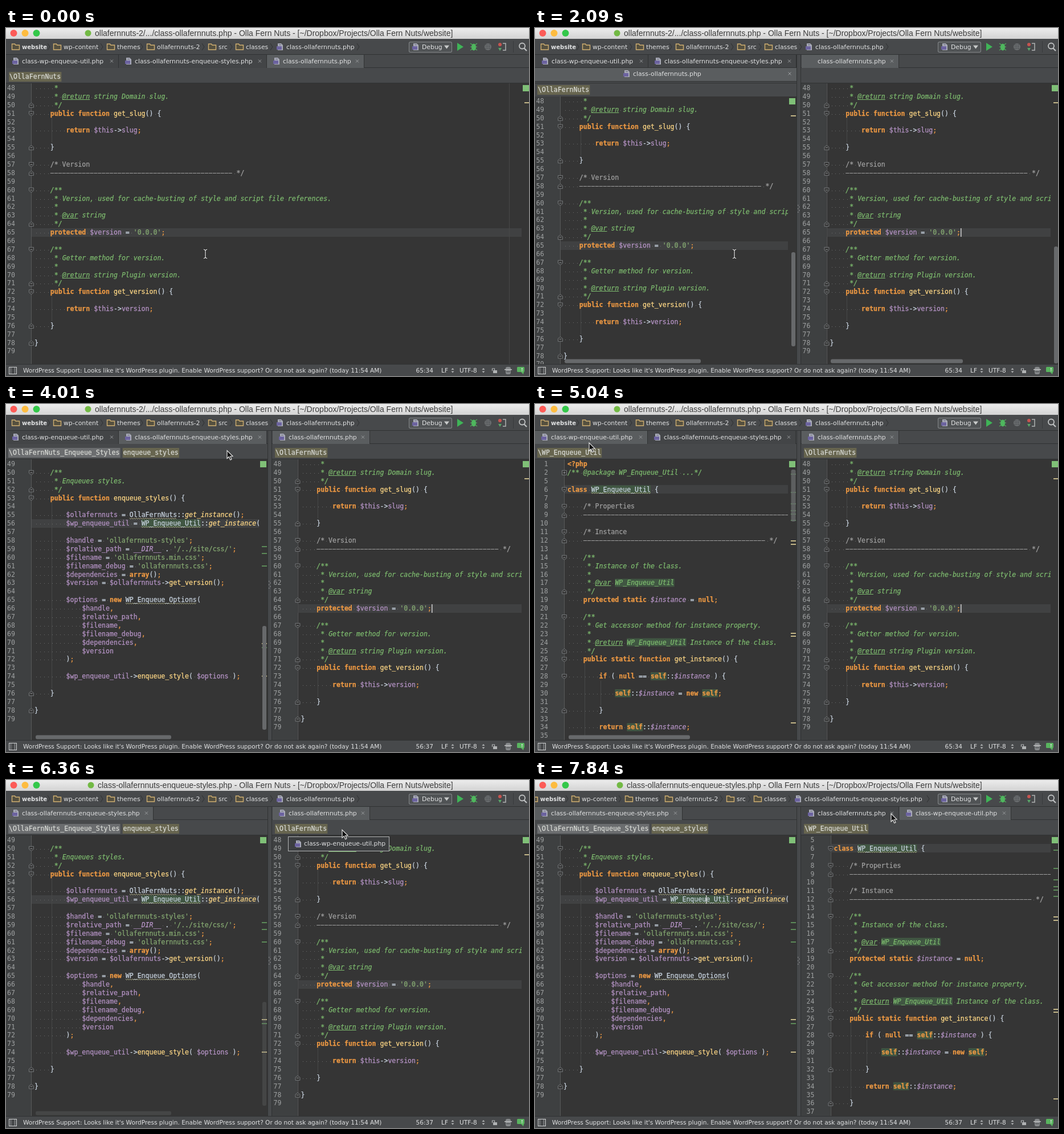
Write an HTML page with a canvas that moves like this. It is 918 px wide and 610 px high and loops after 8 s.

```html
<!DOCTYPE html>
<html lang="en">
<head>
<meta charset="utf-8">
<title>Editor split</title>
<style>
html, body { margin: 0; width: 100%; height: 100%; overflow: hidden; background: #363636; }
canvas { display: block; }
</style>
</head>
<body>
<canvas id="stage" width="918" height="610"></canvas>
<script>
const ctx = document.getElementById('stage').getContext('2d');
const LOOP = 8000, TICK = 147.8, LAST_TICK = 53;
const CHAR = 6.95, LINE = 14.887, BOTTOM = 589;
const MONO = '11.54px "DejaVu Sans Mono", monospace';
const UI = '10.85px "DejaVu Sans", sans-serif';
const SMALL = '10.55px "DejaVu Sans", sans-serif';
const COLOR = {
  bar: '#47494b', edge: '#303233', editor: '#353535', gutter: '#3e4041', caretRow: '#404142',
  text: '#c8d3df', keyword: '#ec9843', variable: '#b694c6', string: '#86aa72', call: '#ffd886',
  doc: '#7dba6e', comment: '#a1a1a1', mark: '#405642', number: '#9ea0a1', label: '#e0e1e2',
  green: '#5c8a58', tan: '#c3b687', ok: '#7fc077'
};
const KEYWORDS = new Set('public protected static function return class new null if self array'.split(' '));
const DASHES = '-'.repeat(46);

const makeFile = (name, crumbs, first, fold, caretLine, marks, source) => ({
  name, crumbs, fold, caretLine, marks,
  rows: source.split('\n').slice(1, -1).map((code, i) => ({ code, number: first(i) }))
});

const main = makeFile('class-ollafernnuts.php', ['\\OllaFernNuts'], i => i + 48, 44, 65,
  { tan: [131], green: [] }, `
     *
     * @return string Domain slug.
     */
    public function get_slug() {

        return $this->slug;

    }

    /* Version
    ${DASHES} */

    /**
     * Version, used for cache-busting of style and script file references.
     *
     * @var string
     */
    protected $version = '0.0.0';

    /**
     * Getter method for version.
     *
     * @return string Plugin version.
     */
    public function get_version() {

        return $this->version;

    }

}

`);

const util = makeFile('class-wp-enqueue-util.php', ['\\WP_Enqueue_Util'], i => i < 2 ? i + 1 : i + 3, 51, 6,
  { tan: [240, 246, 402, 407, 559], green: [123, 155, 175, 187, 193, 204] }, `
<?php
/** @package WP_Enqueue_Util ...*/

class WP_Enqueue_Util {

    /* Properties
    ${DASHES + DASHES} */

    /* Instance
    ${DASHES} */

    /**
     * Instance of the class.
     *
     * @var WP_Enqueue_Util
     */
    protected static $instance = null;

    /**
     * Get accessor method for instance property.
     *
     * @return WP_Enqueue_Util Instance of the class.
     */
    public static function get_instance() {

        if ( null == self::$instance ) {

            self::$instance = new self;

        }

        return self::$instance;

    }

`);

const styles = makeFile('class-ollafernnuts-enqueue-styles.php', ['\\OllaFernNuts_Enqueue_Styles', 'enqueue_styles'],
  i => i + 49, 44, 56, { tan: [420, 477], green: [250, 262, 284, 427] }, `

    /**
     * Enqueues styles.
     */
    public function enqueue_styles() {

        $ollafernnuts = OllaFernNuts::get_instance();
        $wp_enqueue_util = WP_Enqueue_Util::get_instance();

        $handle = 'ollafernnuts-styles';
        $relative_path = __DIR__ . '/../site/css/';
        $filename = 'ollafernnuts.min.css';
        $filename_debug = 'ollafernnuts.css';
        $dependencies = array();
        $version = $ollafernnuts->get_version();

        $options = new WP_Enqueue_Options(
            $handle,
            $relative_path,
            $filename,
            $filename_debug,
            $dependencies,
            $version
        );

        $wp_enqueue_util->enqueue_style( $options );

    }

}

`);

function rect(x, y, w, h, color) {
  ctx.fillStyle = color;
  ctx.fillRect(x, y, w, h);
}
function frameRect(x, y, w, h, color) {
  ctx.strokeStyle = color;
  ctx.lineWidth = 1;
  ctx.strokeRect(x + .5, y + .5, w - 1, h - 1);
}
function rounded(x, y, w, h, r, color) {
  ctx.fillStyle = color;
  ctx.beginPath();
  ctx.roundRect(x, y, w, h, r);
  ctx.fill();
}
function disc(x, y, r, color) {
  ctx.fillStyle = color;
  ctx.beginPath();
  ctx.arc(x, y, r, 0, 7);
  ctx.fill();
}
function path(points, fill, stroke, width = 1) {
  ctx.beginPath();
  points.forEach(([x, y], i) => i ? ctx.lineTo(x, y) : ctx.moveTo(x, y));
  if (fill) { ctx.closePath(); ctx.fillStyle = fill; ctx.fill(); }
  if (stroke) { ctx.strokeStyle = stroke; ctx.lineWidth = width; ctx.stroke(); }
}
function text(str, x, y, color = COLOR.label, font = UI, align = 'left') {
  ctx.font = font;
  ctx.fillStyle = color;
  ctx.textAlign = align;
  ctx.fillText(str, x, y);
}
function clipped(x, y, w, h, draw) {
  ctx.save();
  ctx.beginPath();
  ctx.rect(x, y, w, h);
  ctx.clip();
  draw();
  ctx.restore();
}

function fileIcon(x, y) {
  path([[x + 2, y - 6], [x + 8, y - 6], [x + 11, y - 3], [x + 11, y + 6], [x + 2, y + 6]], '#a9abb8');
  rect(x, y - 1, 9, 6, '#6c63a0');
  rect(x + 4, y - 4, 4, 1, '#66687a');
}
function folderIcon(x, y) {
  path([[x + .5, y + 5], [x + .5, y - 5], [x + 5.5, y - 5], [x + 7, y - 3], [x + 13.5, y - 3], [x + 13.5, y + 5], [x + .5, y + 5]],
    '#55503f', '#cfae71', 1.4);
}
function closeIcon(x, y) {
  path([[x - 2.5, y - 2.5], [x + 2.5, y + 2.5]], null, '#999c9e');
  path([[x + 2.5, y - 2.5], [x - 2.5, y + 2.5]], null, '#999c9e');
}
function updown(x) {
  path([[x - 2.5, 599], [x, 596], [x + 2.5, 599]], '#b0b2b3');
  path([[x - 2.5, 601.5], [x, 604.5], [x + 2.5, 601.5]], '#b0b2b3');
}

function squiggle(x, width, y) {
  const points = [];
  for (let i = 0; i <= width; i += 2) points.push([x + i, y + (i % 4 ? 1 : -1)]);
  path(points, null, '#b3b28a', 1);
}

// A hairline outline gives the code its slightly heavy smoothing.
function drawToken(str, x, y, color, style = '') {
  text(str, x, y + 4, color, style + ' ' + MONO);
  ctx.strokeStyle = color;
  ctx.lineWidth = .25;
  ctx.strokeText(str, x, y + 4);
}

function drawDoc(code, x, y) {
  const tagged = /^\s+\* @/.test(code);
  for (const { 0: part, index } of code.matchAll(/@\w+|WP_Enqueue_Util|\S+|\s+/g)) {
    const left = x + index * CHAR, width = part.length * CHAR;
    if (tagged && part === 'WP_Enqueue_Util') rect(left, y - 7, width, 14, COLOR.mark);
    const tag = tagged && part[0] === '@';
    drawToken(part, left, y, COLOR.doc, 'italic');
    if (tag) rect(left, Math.round(y + 5), width, 1, COLOR.doc);
  }
}

function drawComment(code, x, y) {
  const dashes = code.match(/-{9,}/);
  if (!dashes) return drawToken(code, x, y, COLOR.comment);
  const start = x + dashes.index * CHAR, end = start + dashes[0].length * CHAR;
  ctx.setLineDash([6.2, CHAR - 6.2]);
  path([[start, Math.round(y) + .5], [end, Math.round(y) + .5]], null, COLOR.comment);
  ctx.setLineDash([]);
  drawToken('*/', end + CHAR, y, COLOR.comment);
}

function drawCode(code, x, y) {
  let previous = '';
  for (const { 0: part, index } of code.matchAll(/'[^']*'|\$\w+|<\?php|\w+|->|::|\s+|./g)) {
    const left = x + index * CHAR, width = part.length * CHAR;
    const rest = code.slice(index + part.length);
    let color = COLOR.text, style = '';
    if (part[0] === "'") color = COLOR.string;
    else if (part[0] === '$') {
      color = COLOR.variable;
      if (part === '$instance') style = 'italic';
    } else if (KEYWORDS.has(part) || part === '<?php') {
      color = COLOR.keyword;
      style = 'bold';
      if (part === 'self') rect(left, y - 7, width, 14, COLOR.mark);
    } else if (part === '__DIR__') {
      color = COLOR.variable;
      style = 'italic';
    } else if (/^[A-Z]/.test(part)) {
      if (part === 'WP_Enqueue_Util') rect(left, y - 7, width, 14, COLOR.mark);
      squiggle(left, width, y + 6.5);
    } else if (/^\w/.test(part)) {
      if (rest[0] === '(') {
        color = COLOR.call;
        if (previous === '::') style = 'italic';
      } else if (previous === '->') color = COLOR.variable;
    } else if (part === ';' || part === ',') color = COLOR.keyword;
    drawToken(part, left, y, color, style);
    previous = part;
  }
}

function foldMark(code, x, y) {
  const opens = /\/\*|\{$/.test(code), closes = /\*\/$|^\s*\}$/.test(code);
  if (!opens && !closes) return;
  const a = opens ? -4 : 4, tip = opens ? 4 : -4;
  const shape = opens && closes
    ? [[x - 4, y - 4], [x + 4, y - 4], [x + 4, y + 4], [x - 4, y + 4], [x - 4, y - 4]]
    : [[x - 4, y + a], [x + 4, y + a], [x + 4, y + tip / 4], [x, y + tip], [x - 4, y + tip / 4], [x - 4, y + a]];
  path(shape, COLOR.editor, '#7b7e80', .9);
  path([[x - 2, y], [x + 2, y]], null, '#8b8e90');
  if (opens && closes) path([[x, y - 2], [x, y + 2]], null, '#8b8e90');
}

function drawGuides(rows, x, yOf) {
  rows.forEach(({ code }, i) => {
    const indent = code.search(/\S/);
    if (indent < 1 || !code.endsWith('{')) return;
    const end = rows.findIndex((row, j) => j > i && row.code === ' '.repeat(indent) + '}');
    if (end > i) rect(Math.round(x + indent * CHAR + 2), yOf(i) + 8, 1, yOf(end) - yOf(i) - 16, '#474848');
  });
}

// One editor with gutter, code, error stripe and optional caret column.
function drawEditor({ file, x, textRight, right, top = 97, skip = 0, caret = -1 }) {
  const rows = file.rows.slice(skip);
  const fold = x + file.fold, left = fold + 6;
  const yOf = i => top + 8 + i * LINE;
  rect(x, top, right + 2 - x, BOTTOM - top, COLOR.editor);
  rect(x, top, fold - x, BOTTOM - top, COLOR.gutter);
  rect(Math.round(fold), top, 1, BOTTOM - top, '#58595a');
  clipped(x, top, textRight - x, BOTTOM - top, () => {
    const current = rows.findIndex(row => row.number === file.caretLine);
    rect(fold + 1, Math.round(yOf(current) - 7.5), textRight, 15, COLOR.caretRow);
    rect(Math.round(left + 120 * CHAR) - 1, top, 1, BOTTOM - top, '#484848');
    drawGuides(rows, left, yOf);
    rows.forEach(({ code, number }, i) => {
      const y = yOf(i);
      text(number, fold - 28, y + 4, COLOR.number, MONO, 'right');
      foldMark(code, fold + .5, y + .5);
      for (const { index } of code.matchAll(/ /g)) rect(Math.round(left + index * CHAR + 3), Math.round(y + 1), 1, 1, '#6c6d6d');
      if (/^\s*(\/\*\*|\*)/.test(code)) drawDoc(code, left, y);
      else if (/^\s*(\/\*|-{9})/.test(code)) drawComment(code, left, y);
      else drawCode(code, left, y);
    });
    if (caret >= 0) rect(Math.round(left + caret * CHAR), Math.round(yOf(current) - 7.5), 1.5, 15, '#d0d0d0');
  });
  rect(right - 11, top + 3, 11, 11, COLOR.ok);
  for (const kind of ['green', 'tan']) {
    for (const y of file.marks[kind]) rect(right - 8, y + top - 98, 9, 2, COLOR[kind]);
  }
}

function drawCrumbs(file, x, y) {
  let left = x + 4;
  file.crumbs.forEach((crumb, i) => {
    const width = crumb.length * CHAR + 2;
    rect(left, y - 8, width, 17, i === file.crumbs.length - 1 ? '#67654f' : '#6b6d6f');
    drawToken(crumb, left + 1, y, '#d8dad5');
    left += width + 4;
  });
}

function drawTab(x, end, file, active, icon = true) {
  rect(x, 47, end - x, 23, active ? '#5a5d5f' : '#434547');
  rect(end, 47, 1, 23, COLOR.edge);
  if (icon) fileIcon(x + 11, 58);
  text(file.name, x + 28, 62);
  closeIcon(end - 11.5, 58);
}

const fade = (tick, end) => Math.max(0, Math.min(1, (end - tick) / 3));
function scrollbar(x, y, w, h, alpha) {
  ctx.globalAlpha = alpha;
  rounded(x, y, w, h, 3, '#67696b');
  ctx.globalAlpha = 1;
}

function drawTitle(tick) {
  const shade = ctx.createLinearGradient(0, 0, 0, 19);
  shade.addColorStop(0, '#ececec');
  shade.addColorStop(1, '#d3d3d3');
  rect(0, 0, 918, 19, shade);
  ['#fc5b57', '#fdbc40', '#34c84a'].forEach((color, i) => disc(13.5 + 20 * i, 9, 6, color));
  const late = tick >= 41, x = late ? 161 : 156;
  disc(x - 12, 9, 5.5, '#72b944');
  text((late ? styles.name : 'ollafernnuts-2/.../' + main.name) +
    ' - Olla Fern Nuts - [~/Dropbox/Projects/Olla Fern Nuts/website]', x, 14, '#3d3d3d',
    '14px "Liberation Sans", Arial, sans-serif');
}

function drawNav(tick) {
  rect(0, 19, 918, 28, COLOR.bar);
  rect(0, 46, 918, 1, COLOR.edge);
  const late = tick >= 48, shift = late ? -19 : 0;
  const items = [['website', 10, 75], ['wp-content', 83, 168], ['themes', 177, 238],
    ['ollafernnuts-2', 247, 346], ['src', 355, 395], ['classes', 403, 466]];
  const chevron = x => path([[x - 2, 27], [x + 2, 33], [x - 2, 39]], null, '#2f3132');
  items.forEach(([name, x, end], i) => {
    folderIcon(x + shift, 33);
    text(name, x + 18 + shift, 37, COLOR.label, i ? UI : 'bold 10px "DejaVu Sans", sans-serif');
    chevron(end + shift);
  });
  fileIcon(475 + shift, 33);
  text((late ? styles : main).name, 492 + shift, 37);
  chevron(late ? 690 : 618);

  rounded(707, 24, 76, 19, 3, '#85888a');
  rounded(708, 25, 74, 17, 2, '#505355');
  fileIcon(713, 33);
  text('Debug', 730, 37);
  path([[769, 30.5], [778, 30.5], [773.5, 36.5]], '#c8caca');
  path([[792, 26], [803, 33], [792, 40]], '#3fb457');
  for (let i = -1; i < 2; i++) path([[815, 33 + i * 6], [821, 33 + i * 2], [827, 33 + i * 6]], null, '#4faf5a', 1.2);
  ctx.fillStyle = '#4fb75e';
  ctx.beginPath();
  ctx.ellipse(821, 33.5, 4, 6, 0, 0, 7);
  ctx.fill();
  disc(846, 33, 6, '#6b6e70');
  for (let i = 0; i < 9; i++) rect(842 + i % 3 * 3, 29 + Math.floor(i / 3) * 3, 1.5, 1.5, '#44474a');
  disc(867, 29, 3, '#c75450');
  path([[864, 35], [870, 35], [867, 40]], '#59a869');
  path([[872, 27], [877, 27], [877, 39], [872, 39]], null, '#b0b2b3', 1.5);
  rect(890, 23, 1, 20, '#393b3d');
  ctx.strokeStyle = '#bfc1c2';
  ctx.lineWidth = 1.8;
  ctx.beginPath();
  ctx.arc(906, 31.5, 5, 0, 7);
  ctx.stroke();
  path([[909.5, 35.5], [914, 40]], null, '#bfc1c2', 2.2);
}

function drawStatus(tick) {
  rect(0, BOTTOM, 918, 21, COLOR.bar);
  rect(0, BOTTOM, 918, 1, COLOR.edge);
  frameRect(8, 594, 8, 13, '#9a9c9e');
  frameRect(5, 594, 14, 13, '#d0d2d3');
  text("WordPress Support: Looks like it's WordPress plugin. Enable WordPress support? Or do not ask again? (today 11:54 AM)",
    30, 604, COLOR.label, SMALL);
  const onStyles = tick >= 41 || tick === 27 || tick === 28;
  text(onStyles ? '56:37' : tick >= 36 ? '6:7' : '65:34', 750, 604, COLOR.label, SMALL, 'right');
  text('LF', 764, 604, COLOR.label, SMALL);
  updown(784);
  text('UTF-8', 796, 604, COLOR.label, SMALL);
  updown(838);
  path([[853.5, 601], [853.5, 597], [857.5, 597], [857.5, 601]], null, '#b0b2b3', 1.2);
  rect(855, 600, 7, 5, '#b0b2b3');
  rounded(877, 594, 9, 13, 3, '#85888a');
  rect(875, 598, 13, 1.5, '#bfc1c2');
  rect(878, 602, 7, 1, '#44474a');
  rounded(897, 594, 13, 9, 1.5, '#59b45f');
  path([[904, 603], [909, 603], [908, 607]], '#59b45f');
  rect(905, 596, 1.5, 3, '#e4e6e4');
  rect(905, 600, 1.5, 1.5, '#e4e6e4');
}

function drawSingle(tick) {
  drawTab(0, 197, util);
  drawTab(198, 457, styles);
  drawTab(458, 628, main, true);
  drawCrumbs(main, 1, 85);
  const caret = tick >= 1 && tick < 4 || tick >= 7 && tick < 11;
  drawEditor({ file: main, x: 0, textRight: 905, right: 918, caret: caret ? 33 : -1 });
}

function drawLeft(tick) {
  const pane = { x: 0, textRight: 444, right: 457 };
  if (tick < 26) {
    drawTab(1, 198, util);
    drawTab(199, 458, styles);
    rect(0, 70, 459, 23, '#5a5d5f');
    rect(0, 69, 459, 1, COLOR.edge);
    rect(0, 93, 459, 1, COLOR.edge);
    fileIcon(155, 80);
    text(main.name, 172, 84);
    closeIcon(447, 80);
    drawCrumbs(main, 0, 108);
    drawEditor({ ...pane, file: main, top: 120 });
    scrollbar(450, 393, 7, 165, fade(tick, 23));
    scrollbar(52, 580.5, 239, 7, fade(tick, 23));
    return;
  }
  const file = tick === 34 || tick === 35 ? util : styles;
  if (tick < 36) {
    drawTab(0, 197, util, file === util);
    drawTab(198, 457, styles, file === styles);
  } else drawTab(0, 258, styles, true);
  drawCrumbs(file, 0, 85);
  const caret = tick >= 36 && tick < 42 || tick >= 47 && tick < 50 || tick >= 52;
  drawEditor({ ...pane, file, caret: caret ? 36 : -1 });
  if (file === util) {
    scrollbar(449.5, 115, 8, 91, .8);
    scrollbar(59, 580.5, 213, 7, 1);
  } else {
    const alpha = fade(tick, tick < 36 ? 32 : 44);
    scrollbar(450, 389, 7, 182, alpha);
    scrollbar(52, 580.5, 238, 7, alpha);
  }
}

function drawRight(tick) {
  const pane = { x: 467.5, textRight: 905, right: 918 };
  const moved = tick >= 44;
  drawTab(468, 638, main, !moved, tick >= 21);
  if (moved) {
    drawTab(640, 835, util, true, tick >= 48);
    if (tick >= 48) drawCrumbs(util, 468, 85);
    drawEditor({ ...pane, file: util, skip: 2 });
    scrollbar(911, 115, 7, 95, fade(tick, 49) * .6);
    scrollbar(527, 580.5, 206, 7, fade(tick, 53));
    return;
  }
  if (tick >= 21) drawCrumbs(main, 468, 85);
  const caret = tick < 36 && (tick - 13) % 7 < 4;
  drawEditor({ ...pane, file: main, caret: caret ? 33 : -1 });
  scrollbar(911, 383, 7, 205, fade(tick, 23));
  scrollbar(519, 580.5, 232, 7, fade(tick, 23));
}

const POINTER = [[16, 350, 396], [17, 362, 330], [18, 398, 160], [19, 416, 68], [21, 440, 72], [23, 446, 75],
  [26, 446, 75], [28, 330, 88], [30, 150, 78], [32, 95, 68], [35, 95, 68], [36, 180, 72], [38, 480, 66],
  [39, 569, 65], [41, 588, 80], [44, 591, 91], [49, 591, 91], [51, 605, 75], [53, 625, 59]];

function pointerAt(tick) {
  const next = POINTER.findIndex(key => key[0] >= tick);
  const b = POINTER[next], a = POINTER[Math.max(0, next - 1)];
  const k = a === b ? 1 : (tick - a[0]) / (b[0] - a[0]);
  return [a[1] + (b[1] - a[1]) * k, a[2] + (b[2] - a[2]) * k];
}

function drawPointer(tick) {
  const [x, y] = pointerAt(tick);
  if (tick >= 35 && tick < 44) {
    const left = Math.max(0, Math.round(x - 95)), top = Math.round(y + 12);
    rect(left, top, 178, 26, '#3c3e40');
    frameRect(left, top, 178, 26, '#b3b5b6');
    fileIcon(left + 12, top + 13);
    text(util.name, left + 28, top + 16);
  }
  if (y > 100) {
    for (const [color, width] of [['#222', 3], ['#eee', 1.2]]) {
      path([[x - 3, y - 8], [x, y - 6.5], [x + 3, y - 8]], null, color, width);
      path([[x, y - 6.5], [x, y + 6.5]], null, color, width);
      path([[x - 3, y + 8], [x, y + 6.5], [x + 3, y + 8]], null, color, width);
    }
    return;
  }
  const arrow = [[0, 0], [0, 14], [3.3, 11], [5.7, 16.5], [8, 15.5], [5.7, 10.2], [10, 10], [0, 0]];
  path(arrow.map(([dx, dy]) => [x + dx, y + dy]), '#111', '#eee', 1.1);
}

function drawScene(time) {
  const tick = Math.min(LAST_TICK, Math.floor(time / TICK));
  drawTitle(tick);
  drawNav(tick);
  rect(0, 47, 918, BOTTOM - 47, COLOR.bar);
  rect(0, 69, 918, 1, COLOR.edge);
  rect(0, 96, 918, 1, COLOR.edge);
  if (tick < 13) drawSingle(tick);
  else {
    drawLeft(tick);
    drawRight(tick);
    rect(459, 47, 8, BOTTOM - 47, COLOR.bar);
    rect(459, 47, 1, BOTTOM - 47, COLOR.edge);
    rect(466, 47, 1, BOTTOM - 47, COLOR.edge);
    for (let i = 0; i < 5; i++) rect(461 + i % 2 * 2, 310 + i * 3, 1.5, 1.5, '#8a8c8e');
  }
  drawStatus(tick);
  drawPointer(tick);
}

const start = performance.now();
function animate() {
  drawScene((performance.now() - start) % LOOP);
  requestAnimationFrame(animate);
}
animate();
</script>
</body>
</html>
```
